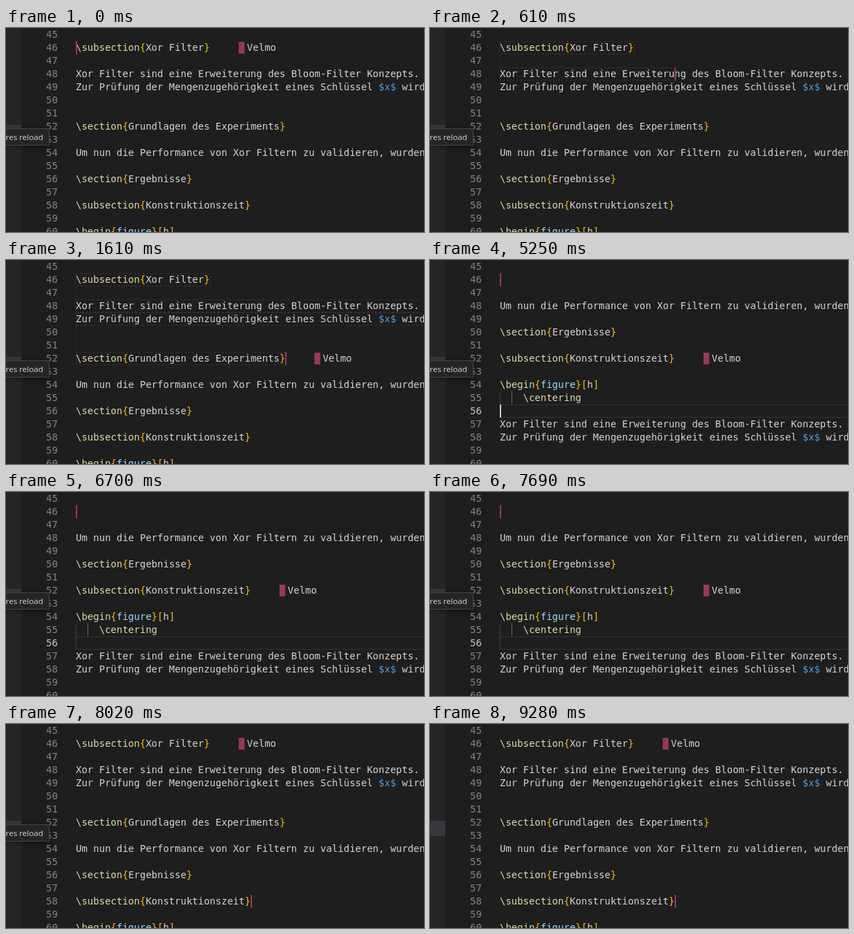
Recreate the animation shown at these times as an HTML page. Size 605x295 px, loop 9890 ms.

```html
<!DOCTYPE html>
<html lang="de">
<head>
<meta charset="utf-8">
<title>Gemeinsames Bearbeiten</title>
<style>
html, body { margin: 0; width: 100%; height: 100%; overflow: hidden; background: #1e1e1e; }
svg { display: block; width: 605px; height: 295px; }
text { white-space: pre; font: 14px "DejaVu Sans Mono", monospace; fill: #d4d4d4; }
.num { fill: #858585; }
.num.active { fill: #c6c6c6; }
.brace { fill: #f5bd14; }
.command { fill: #dcdcaa; }
.math { fill: #569cd6; }
.env { fill: #9cdcfe; }
.plain .math, .plain .command { fill: #d4d4d4; }
.peer { fill: #97375f; }
.sel { fill: none; stroke: #97375f; stroke-opacity: .42; stroke-dasharray: 3 3; }
.tip rect { filter: drop-shadow(0 2px 4px rgba(0, 0, 0, .36)); }
.tip text { font: 11.6px "Noto Sans", "Open Sans", sans-serif; fill: #cccccc; }
</style>
</head>
<body>
<svg viewBox="0 0 605 295">
  <rect width="605" height="295" fill="#1e1e1e"/>
  <rect width="22" height="295" fill="#252526"/>
  <rect y="140" width="22" height="22" fill="#37373d"/>
  <g id="editor"></g>
  <g id="tip" class="tip">
    <rect x="-5" y="145.5" width="67.5" height="24" fill="#252526" stroke="#454545"/>
    <text x="54" y="162" text-anchor="end">res reload</text>
  </g>
</svg>
<script>
const LOOP = 9890, FIRST = 45, ROW = 19, LEFT = 101, CHAR = 8.428;
const PEER = 'Velmo';
const editor = document.getElementById('editor');
const tip = document.getElementById('tip');

const moved = [
  'Xor Filter sind eine Erweiterung des Bloom-Filter Konzepts.',
  'Zur Prüfung der Mengenzugehörigkeit eines Schlüssel $x$ wird'
];
const rest = [
  'Um nun die Performance von Xor Filtern zu validieren, wurden', '',
  '\\section{Ergebnisse}', '',
  '\\subsection{Konstruktionszeit}', '',
  '\\begin{figure}[h]'
];
const before = ['', '\\subsection{Xor Filter}', '', ...moved, '', '',
  '\\section{Grundlagen des Experiments}', '', ...rest];
const after = ['', '', '', ...rest, '    \\centering', '', ...moved, '', ''];

// Peer caret while dragging the selection: time, line, column
const drag = [
  [0, 46, 0], [70, 46, 3], [140, 46, 8], [210, 46, 14], [280, 46, 20],
  [350, 47, 0], [410, 48, 15], [480, 48, 21], [540, 48, 26], [610, 48, 30],
  [680, 48, 34], [750, 49, 36], [820, 49, 38], [890, 49, 40], [1020, 50, 0],
  [1290, 51, 0], [1610, 52, 36]
];
const blinks = [5250, 5710, 6240, 6700, 7230, 7690];

const rowY = line => (line - FIRST) * ROW;
const colX = col => LEFT + col * CHAR;
const rect = (x, y, w, h, attrs) =>
  `<rect x="${x}" y="${y}" width="${w}" height="${h}" ${attrs}/>`;
const label = (x, line, cls, s) =>
  `<text x="${x}" y="${rowY(line) + 14}" class="${cls}">${s}</text>`;

const colour = s => s.replace(/\\\w+|\$x\$|figure|[{}[\]]/g, m => {
  const cls = m[0] === '\\' ? 'command' : m[0] === '$' ? 'math'
    : m === 'figure' ? 'env' : 'brace';
  return `<tspan class="${cls}">${m}</tspan>`;
});

function stateAt(t) {
  if (t < 5250) {
    const [, line, col] = drag.filter(d => d[0] <= t).pop();
    return { doc: before, line, col, tag: line, select: true };
  }
  if (t < 7950) {
    const on = blinks.filter(b => b <= t).length % 2 === 1;
    return { doc: after, line: 46, col: 0, tag: 52, active: 56, on };
  }
  return { doc: before, line: 58, col: 30, tag: t < 8020 ? 58 : 46, plain: t < 8020 };
}

function selection(doc, line, col) {
  let out = '';
  for (let n = 46; n <= line; n++) {
    const len = n === line ? col : doc[n - FIRST].length;
    const y = rowY(n) + .5;
    out += len
      ? rect(LEFT + .5, y, len * CHAR, ROW - 1, 'class="sel"')
      : `<path d="M${LEFT + .5} ${y}v${ROW - 1}" class="sel"/>`;
  }
  return out;
}

function activeLine(line) {
  const y = rowY(line);
  return rect(LEFT, y, 504, 1, 'fill="#333333"') +
    rect(LEFT, y + ROW - 1, 504, 1, 'fill="#333333"') +
    rect(LEFT, y - ROW, 1, ROW * 2, 'fill="#404040"') +
    rect(118, y - ROW, 1, ROW, 'fill="#75605c"');
}

function peerTag(doc, line) {
  const len = doc[line - FIRST].length;
  const x = colX(len) + (len ? 42 : 33);
  return rect(x, rowY(line) + 1, 8.4, 17, 'class="peer"') + label(x + 12, line, '', PEER);
}

function render(s) {
  let out = s.active ? activeLine(s.active) : '';
  if (s.select) out += selection(s.doc, s.line, s.col);
  s.doc.forEach((text, i) => {
    const n = FIRST + i;
    out += label(58, n, n === s.active ? 'num active' : 'num', n);
    if (text) out += label(LEFT, n, '', colour(text));
  });
  out += peerTag(s.doc, s.tag);
  out += rect(Math.round(colX(s.col)), rowY(s.line), 2, ROW, 'class="peer"');
  if (s.on) out += rect(LEFT, rowY(s.active), 2, ROW, 'fill="#d0d0cc"');
  editor.setAttribute('class', s.plain ? 'plain' : '');
  editor.innerHTML = out;
}

let shown = '';
function draw(t) {
  const s = stateAt(t);
  const key = JSON.stringify(s);
  if (key !== shown) render(s);
  shown = key;
  tip.setAttribute('opacity', t < 9210 ? 1 : t < 9280 ? .5 : 0);
}

const start = performance.now();
function tick() {
  draw((performance.now() - start) % LOOP);
  requestAnimationFrame(tick);
}
tick();
</script>
</body>
</html>
```
